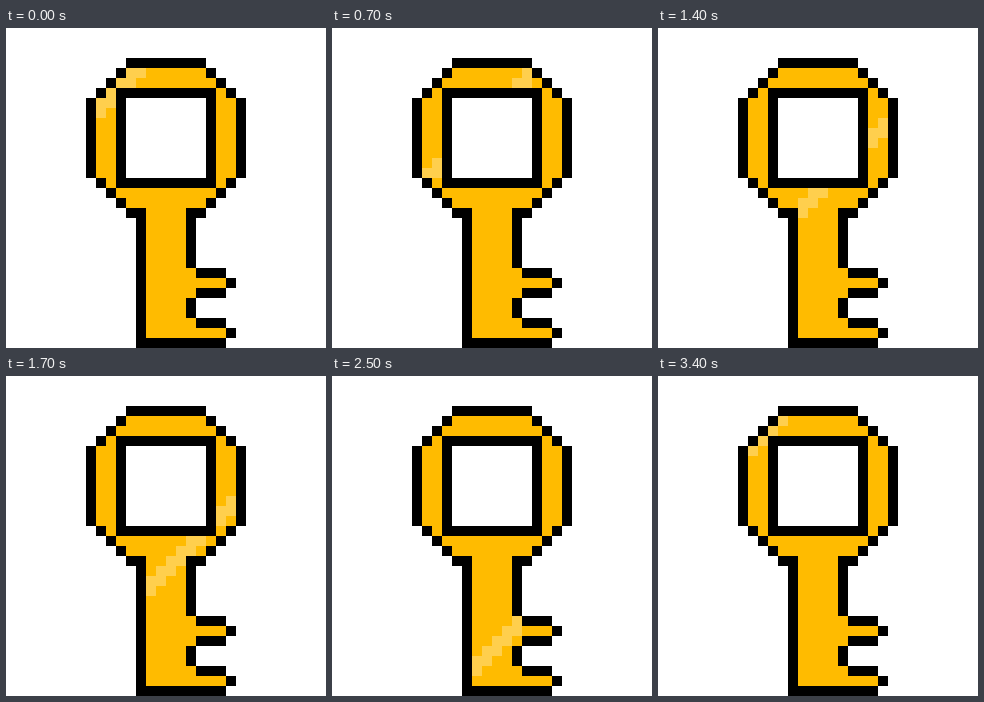
Write an HTML page with a canvas that moves like this. It is 320 by 320 pixels and loops after 3.5 s.

```html
<!DOCTYPE html>
<html lang="en">
<head>
<meta charset="utf-8">
<title>Shining key</title>
<style>
  html, body { margin: 0; width: 100%; height: 100%; overflow: hidden; background: #fff; }
  canvas { display: block; width: 320px; height: 320px; }
</style>
</head>
<body>
<canvas id="stage" width="320" height="320"></canvas>
<script>
const CELL = 10, STEP = 100, STEPS = 35;
const INK = '#000', GOLD = '#ffbb00', SHINE = '#ffcf4d', PAPER = '#fff';
const ctx = document.getElementById('stage').getContext('2d');

function box(color, x, y, w, h) {
  ctx.fillStyle = color;
  ctx.fillRect(x * CELL, y * CELL, w * CELL, h * CELL);
}

// Gold body as rows of { x, y, w }, in cells.
const rows = [];
for (let y = 4; y <= 17; y++) {
  const inset = Math.max(0, 7 - y, y - 14);
  rows.push({ x: 9 + inset, y, w: 14 - 2 * inset });
}
for (let y = 18; y <= 30; y++) {
  const tooth = y === 25 || y === 30;
  const root = y === 24 || y === 26 || y === 29;
  rows.push({ x: 14, y, w: tooth ? 8 : root ? 5 : 4 });
}

// First lit diagonal (x + y) at each step; it jumps one cell by the lower-left corner.
function diagonal(step) {
  if (step === STEPS - 1) return 15;
  return step < 8 ? 16 + step : 17 + step;
}

function draw(step) {
  box(PAPER, 0, 0, 32, 32);
  for (const { x, y, w } of rows) {
    box(INK, x - 1, y, w + 2, 1);
    box(INK, x, y - 1, w, 3);
  }
  box(INK, 13, 31, 1, 1);

  const d = diagonal(step);
  for (const { x, y, w } of rows) {
    box(GOLD, x, y, w, 1);
    const from = Math.max(x, d - y);
    const to = Math.min(x + w, d - y + 2);
    if (to > from) box(SHINE, from, y, to - from, 1);
  }

  box(INK, 11, 6, 10, 10);
  box(PAPER, 12, 7, 8, 8);
}

const start = performance.now();
function tick() {
  const time = performance.now() - start;
  draw(Math.floor(time / STEP) % STEPS);
  requestAnimationFrame(tick);
}
tick();
</script>
</body>
</html>
```
